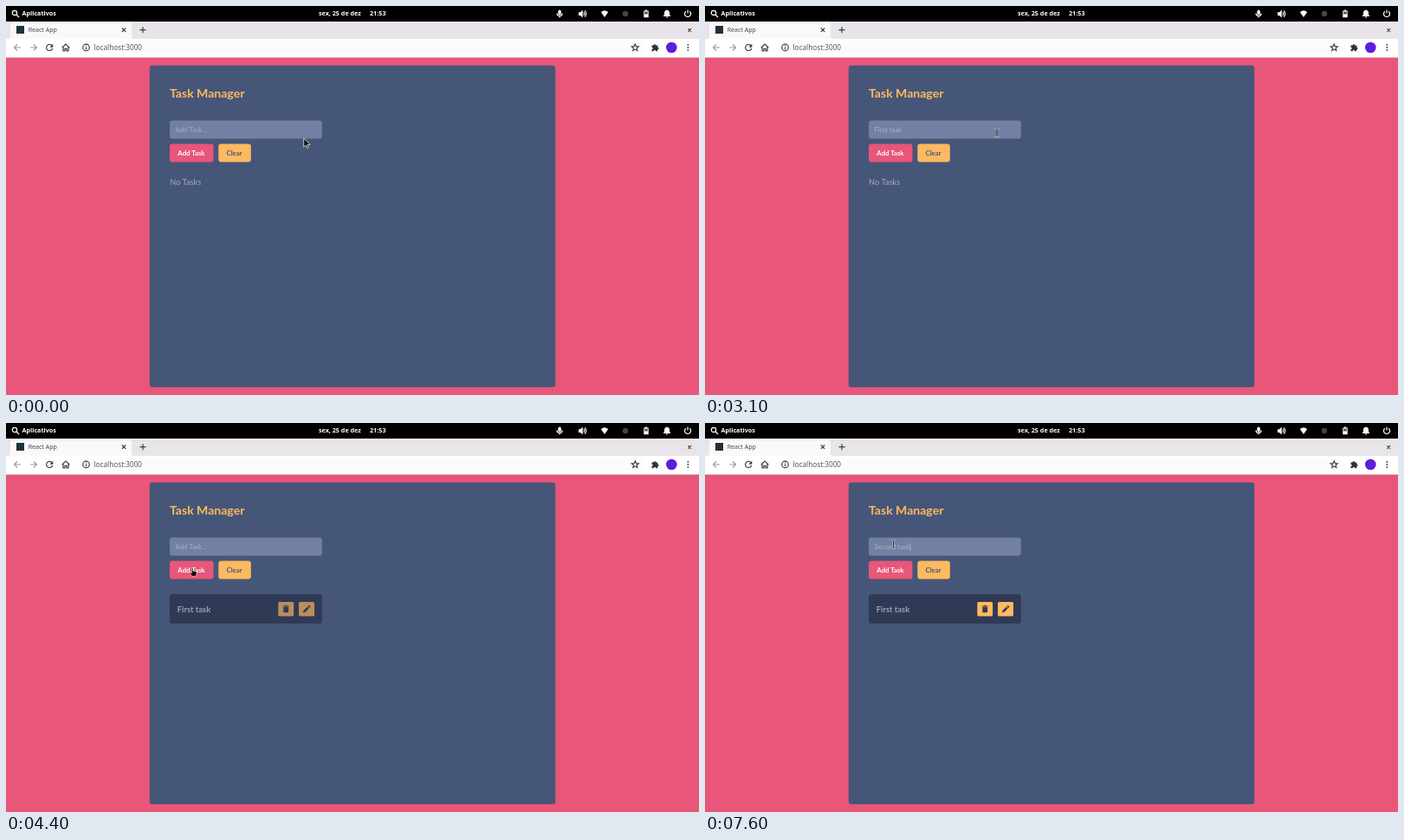
Write an HTML page that moves like this. It is 800 by 450 pixels and loops after 8000 ms.

```html
<!DOCTYPE html>
<html lang="en">
<head>
<meta charset="utf-8">
<title>Task Manager</title>
<style>
  html, body { margin: 0; width: 100%; height: 100%; overflow: hidden; background: #e8567a; }
  svg { display: block; width: 100vw; height: 100vh; }
  text { font-family: Lato, sans-serif; white-space: pre; }
  .ui text { font-family: "Noto Sans", sans-serif; }
  .bold { font-weight: 700; }
  .line { fill: none; stroke: currentColor; stroke-width: 1.2; }
</style>
</head>
<body>
<svg viewBox="0 0 800 450">
  <rect width="800" height="450" fill="#e8567a"/>

  <!-- Desktop bar -->
  <g class="ui" fill="#fff" color="#fff" font-size="7.2" font-weight="600">
    <rect width="800" height="18" fill="#000"/>
    <circle class="line" cx="10" cy="8" r="2.7"/>
    <path class="line" d="M12 10l3 3"/>
    <text x="18.5" y="11.2">Aplicativos</text>
    <text x="361" y="11.2">sex, 25 de dez</text>
    <text x="420" y="11.2">21:53</text>
    <rect x="637.4" y="4.5" width="3.4" height="6" rx="1.7"/>
    <path class="line" d="M636 8.5q0 3 3.1 3t3.1-3M639.1 11.5v2" stroke-width=".9"/>
    <path d="M661 7.2h2l2.7-2.6v9l-2.7-2.6h-2z"/>
    <path class="line" d="M667 7q1.4 2 0 4M668.3 5.3q2.6 3.7 0 7.4" stroke-width=".9"/>
    <path d="M686.8 7q4.2-3.6 8.4 0L691 13z"/>
    <circle cx="715" cy="9" r="3.2" fill="#454545"/>
    <path d="M737.8 4.5h2.4v1h1.5v7.8h-5.4V5.500h1.500z"/>
    <path d="M737.2 6.500h3.600v3h-3.600z" fill="#555"/>
    <path d="M759 12v-1l1-1V8q0-3 3-3.600 3 .6 3 3.600v2l1 1v1zM762 12.500h2v1h-2z"/>
    <path class="line" d="M784.800 6.300a3.500 3.500 0 1 0 4.400 0M787 4.500v4"/>
  </g>

  <!-- Browser frame -->
  <g class="ui" color="#3c4043">
    <rect y="18" width="800" height="20" fill="#e9e4ea"/>
    <path d="M2 38q3 0 3-3V22q0-4 4-4H141q4 0 4 4v13q0 3 3 3z" fill="#faf8fb"/>
    <rect y="38" width="800" height="21.500" fill="#fff"/>
    <rect y="59" width="800" height=".6" fill="#d8d5da"/>
    <rect x="12" y="23" width="9" height="9" fill="#20303a"/>
    <text x="25.700" y="30.200" font-size="7.030" fill="#45484c">React App</text>
    <path class="line" d="M133.800 25.500l4.400 4.400m0-4.400l-4.400 4.400M154.500 27.700h7m-3.500-3.500v7M787.500 26.200l3.600 3.600m0-3.600l-3.600 3.600" stroke-width="1"/>
    <path class="line" color="#9a9ca0" d="M17 48H9.500m3.500-3.500L9.500 48l3.500 3.500M28 48h7.500m-3.500-3.500l3.500 3.500-3.500 3.500" stroke-width="1"/>
    <path class="line" d="M53 45.700a3.600 3.600 0 1 0 .700 3.300"/>
    <path d="M54.300 43.800v3.900h-3.900z" fill="#3c4043"/>
    <path class="line" d="M64.700 48.200L69 44l4.300 4.200M66 47.500v4.300h2v-2.500h2v2.500h2v-4.300" stroke-width="1.100"/>
    <rect x="82" y="40.500" width="656" height="15" rx="7.500" fill="#fdfcfd"/>
    <circle class="line" cx="92.500" cy="48" r="3.800" stroke-width=".9"/>
    <path class="line" d="M92.500 47.500v2.700M92.500 45.600v1" stroke-width=".9"/>
    <text x="101.500" y="50.900" font-size="8.200" fill="#55585c">localhost:3000</text>
    <path class="line" d="M726.300 44l1.100 2.700 2.900.2-2.200 1.900.700 2.800-2.500-1.500-2.500 1.500.700-2.800-2.200-1.900 2.900-.2z" stroke-width=".8"/>
    <path d="M745.500 45.500h2.200a1.200 1.200 0 0 1 2.400 0h2.200v2.200a1.200 1.200 0 0 1 0 2.400v2.200h-2.200a1.200 1.200 0 0 0-2.400 0h-2.200v-2.200a1.200 1.200 0 0 0 0-2.400z" fill="#2f3235"/>
    <circle cx="768.300" cy="48" r="6.300" fill="#5b1fdc"/>
    <g fill="#3c4043"><circle cx="787.300" cy="45" r=".9"/><circle cx="787.300" cy="48" r=".9"/><circle cx="787.300" cy="51" r=".9"/></g>
  </g>

  <!-- Page -->
  <rect x="165.800" y="68.800" width="468.400" height="372.200" rx="3" fill="#465678"/>
  <text class="bold" x="189" y="106" font-size="14.060" fill="#ffb961">Task Manager</text>
  <rect x="189" y="132.500" width="175.800" height="21" rx="3" fill="#7280a3"/>
  <text id="field" x="195.500" y="146.200" font-size="7.810"></text>
  <rect id="caret" y="139" width=".7" height="9" fill="#b7c1d6"/>
  <rect x="189" y="159.500" width="50.500" height="21" rx="3" fill="#e8567a"/>
  <text class="bold" x="198.300" y="173.200" font-size="7.810" fill="#fff">Add Task</text>
  <rect x="245.300" y="159.500" width="37.500" height="21" rx="3" fill="#ffb961"/>
  <text class="bold" x="254.500" y="173.200" font-size="7.810" fill="#465678">Clear</text>
  <text id="empty" x="189" y="207.200" font-size="9.370" fill="#a0aac0">No Tasks</text>

  <g id="task">
    <rect x="189" y="198" width="175.800" height="34" rx="3" fill="#303a54"/>
    <text class="bold" x="197.800" y="218.800" font-size="9.370" fill="#99a2b5">First task</text>
    <g id="actions" fill="#303a54">
      <rect x="314.300" y="207" width="17.800" height="16.500" rx="1.500" fill="#ffb961"/>
      <rect x="338" y="207" width="18" height="16.500" rx="1.500" fill="#ffb961"/>
      <path d="M319.800 211.500h2l.500-.700h1.800l.500.700h2v1h-6.800zM320.300 213h5.800v5.200q0 1-1 1h-3.800q-1 0-1-1z"/>
      <path d="M343 219.300l.500-2.400 4.200-4.200 1.900 1.900-4.200 4.200zM348.200 212.200l1-1q.5-.4 1 0l.9.9q.4.500 0 1l-1 1z"/>
    </g>
  </g>

  <!-- Pointers, each with its hot spot at 0,0 -->
  <g id="arrow"><path d="M0 0v10.200l2.400-2.200 1.600 3.600 1.700-.8-1.600-3.400h3.400z" fill="#111" stroke="#fff" stroke-width=".7"/></g>
  <g id="beam" fill="none" stroke-linecap="round">
    <path id="beamShape" d="M-2-4.500q2 0 2 1v7q0 1-2 1M2-4.500q-2 0-2 1v7q0 1 2 1" stroke="#e4e7ee" stroke-width="1.700"/>
    <path d="M-2-4.500q2 0 2 1v7q0 1-2 1M2-4.500q-2 0-2 1v7q0 1 2 1" stroke="#222" stroke-width=".8"/>
  </g>
  <g id="hand"><path d="M-.8.2q.8-.8 1.600 0v3.500l3.200.7q1.300.4 1.200 1.800l-.8 3.800H-.7L-3 6.600q-.3-1.300.9-1.100l1.300 1z" fill="#111" stroke="#fff" stroke-width=".6"/></g>
</svg>
<script>
const LOOP = 8000, STEP = 100, TASK_ADDED = 4300;
const $ = id => document.getElementById(id);
const field = $("field"), caret = $("caret");
const pointers = ["arrow", "beam", "hand"].map($);

// Times at which each character is typed.
const entries = [
  { text: "First task", keys: [800, 1300, 1400, 1500, 1600, 1800, 2000, 2200, 2300, 2500], focus: 500, blur: 4100, end: TASK_ADDED },
  { text: "Second task", keys: [5300, 5500, 5700, 5700, 5800, 6000, 6700, 7300, 7400, 7500, 7600], focus: 5100, blur: LOOP, end: LOOP }
];

const moves = [
  { from: [343.7, 153], to: [337, 146.800], start: 0, end: 500 },
  { from: [337, 146.800], to: [215, 168.500], start: 3400, end: 4100 },
  { from: [215, 168.500], to: [217.500, 140.500], start: 4300, end: 5100 }
];

const show = (el, on) => el.setAttribute("visibility", on ? "visible" : "hidden");
const clamp = v => Math.min(1, Math.max(0, v));
const smooth = v => v * v * (3 - 2 * v);

function pointerAt(t) {
  const { from, to, start, end } = moves.findLast(m => t >= m.start);
  const p = smooth(clamp((t - start) / (end - start)));
  return from.map((v, i) => v + (to[i] - v) * p);
}

function pointerKind(x, y) {
  if (x > 189 && x < 365 && y > 132 && y < 153) return "beam";
  const overButton = x < 239.500 || (x > 245 && x < 283);
  return overButton && y > 159 && y < 181 ? "hand" : "arrow";
}

function drawField(t) {
  const { text, keys, focus, blur } = entries.find(e => t < e.end);
  const pressed = keys.filter(k => k <= t);
  const typed = text.slice(0, pressed.length);
  field.textContent = typed || "Add Task...";
  field.setAttribute("fill", typed ? "#a9b5cd" : "#a3aec7");
  const width = typed ? field.getComputedTextLength() : 0;
  caret.setAttribute("x", 195.500 + width);
  const since = t - (pressed.at(-1) ?? focus);
  show(caret, t >= focus && t < blur && since % 1000 < 600);
}

function draw(t) {
  drawField(t);
  show($("empty"), t < TASK_ADDED);
  show($("task"), t >= TASK_ADDED);
  $("actions").setAttribute("opacity", clamp((t - TASK_ADDED + 100) / 300));
  const [x, y] = pointerAt(t), kind = pointerKind(x, y);
  for (const p of pointers) {
    show(p, p.id === kind);
    p.setAttribute("transform", `translate(${x} ${y})`);
  }
}

const origin = performance.now();
function frame() {
  const t = (performance.now() - origin) % LOOP;
  draw(Math.floor(t / STEP) * STEP);
  requestAnimationFrame(frame);
}
frame();
</script>
</body>
</html>
```
